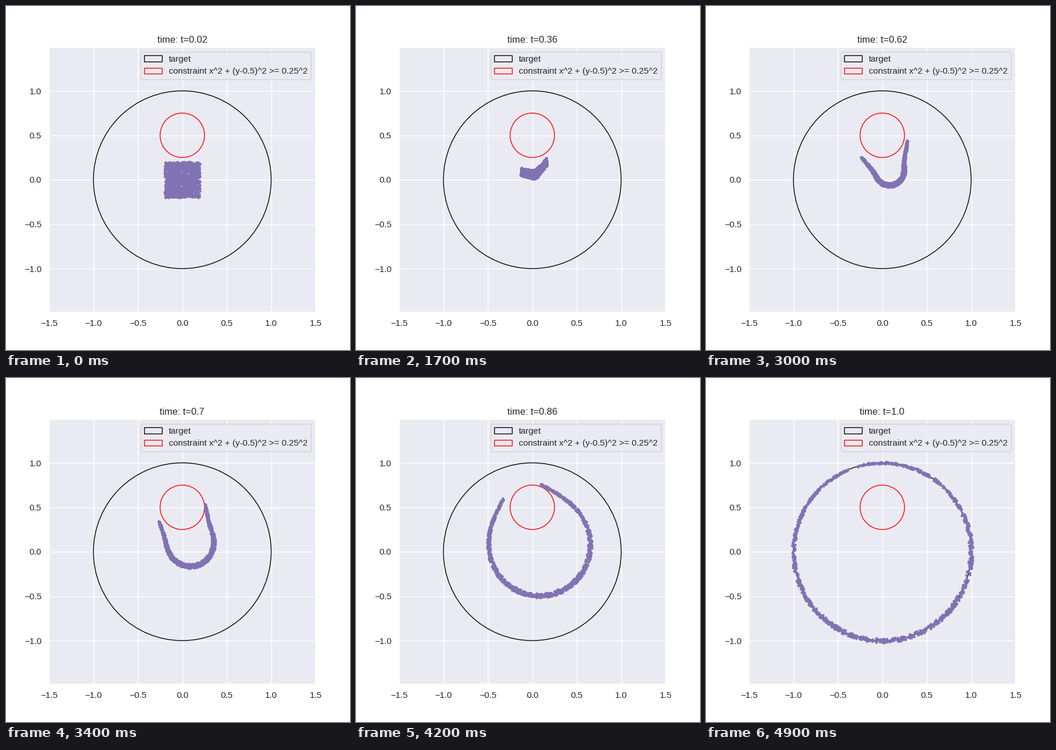
Write a matplotlib script that moves like this. It is 600 px wide and 600 px high and loops after 5 s.

```python
import numpy as np
import matplotlib.pyplot as plt
from matplotlib.animation import FuncAnimation

FRAMES, INTERVAL = 50, 100
INK, PANEL, PURPLE = "0.15", "#EAEAF2", "#8172B3"
OBSTACLE, OBSTACLE_R = np.array([0, 0.5]), 0.25

plt.rcParams.update({
    "font.family": "Liberation Sans", "font.size": 12,
    "text.color": INK, "xtick.color": INK, "ytick.color": INK,
    "axes.facecolor": PANEL, "axes.edgecolor": "white", "axes.linewidth": 1.25,
    "axes.grid": True, "axes.axisbelow": True, "axes.titlesize": 12,
    "grid.color": "white", "grid.linewidth": 1, "patch.linewidth": 1,
    "xtick.labelsize": 11, "ytick.labelsize": 11,
    "xtick.major.size": 6, "ytick.major.size": 6,
    "xtick.bottom": False, "ytick.left": False, "legend.fontsize": 11,
})

# Each particle keeps its place in the starting square: along and across.
along, across = np.random.default_rng(11).uniform(-1, 1, (2, 1000))


def sheet(t):
    """The square, shrinking into a sheared block that drifts upwards."""
    p = np.clip((t - 0.02) / 0.18, 0, 1)
    half = 0.073 + 0.127 * (1 - p) ** 1.5
    x = half * along - 0.005 * p
    y = half * across + 0.04 * p * along + 0.22 * (t - 0.02)
    return np.column_stack([x, y])


def arc(a, t):
    """Centre line: an open, growing ring whose two ends trail outwards."""
    u = 2 * t - 1
    radius = 0.06 + 0.355 * u + 0.25 * u ** 2 + 0.335 * u ** 3
    tail = 0.22 * (1 - u ** 2) * (1 + 0.1 * np.sign(a))
    bend = np.pi * max(1 - t, 1e-3)
    v = np.sin(bend * a) / np.sin(bend)
    start, end = 168 - 56.5 * u, 404 + 62.5 * u
    angle = np.radians((start + end) / 2 + v * (end - start) / 2)
    r = radius + tail * np.abs(v) ** 9
    return np.column_stack([0.06 + 0.08 * u - 0.14 * u ** 4 + r * np.cos(angle),
                            0.105 * (1 - u ** 4) + r * np.sin(angle)])


def strand(t):
    t = max(t, 0.5)
    step = arc(along + 1e-4, t) - arc(along - 1e-4, t)
    normal = np.column_stack([-step[:, 1], step[:, 0]])
    normal /= np.linalg.norm(normal, axis=1, keepdims=True)
    width = 0.024 * (0.35 + 0.65 * np.cos(np.pi * along / 2))
    return arc(along, t) + (width * across)[:, None] * normal


def particles(t):
    mix = np.clip((t - 0.16) / 0.34, 0, 1) ** 1.5
    points = (1 - mix) * sheet(t) + mix * strand(t)
    offset = points - OBSTACLE
    distance = np.linalg.norm(offset, axis=1, keepdims=True)
    return OBSTACLE + offset * np.maximum(1, (OBSTACLE_R + 0.01) / distance)


fig, ax = plt.subplots(figsize=(6, 6), dpi=100)
ax.set_xlim(-1.5, 1.5)
ax.set_ylim(-462 / 310, 462 / 310)
ax.set_xticks(np.arange(-1.5, 1.6, 0.5))
ax.set_yticks(np.arange(-1, 1.1, 0.5))
ax.add_patch(plt.Circle((0, 0), 1, fill=False, ec="black", label="target"))
ax.add_patch(plt.Circle(OBSTACLE, OBSTACLE_R, fill=False, ec="red",
                        label="constraint x^2 + (y-0.5)^2 >= 0.25^2"))
ax.legend(loc="upper right")
dots = ax.scatter(*particles(0.02).T, s=3.4 ** 2, color=PURPLE,
                  linewidths=0, zorder=2)
title = ax.set_title("")


def update(frame):
    t = round(0.02 * (frame + 1), 2)
    dots.set_offsets(particles(t))
    title.set_text(f"time: t={t}")
    return dots, title


anim = FuncAnimation(fig, update, frames=FRAMES, interval=INTERVAL,
                     repeat=True, repeat_delay=0)
plt.show()
```
